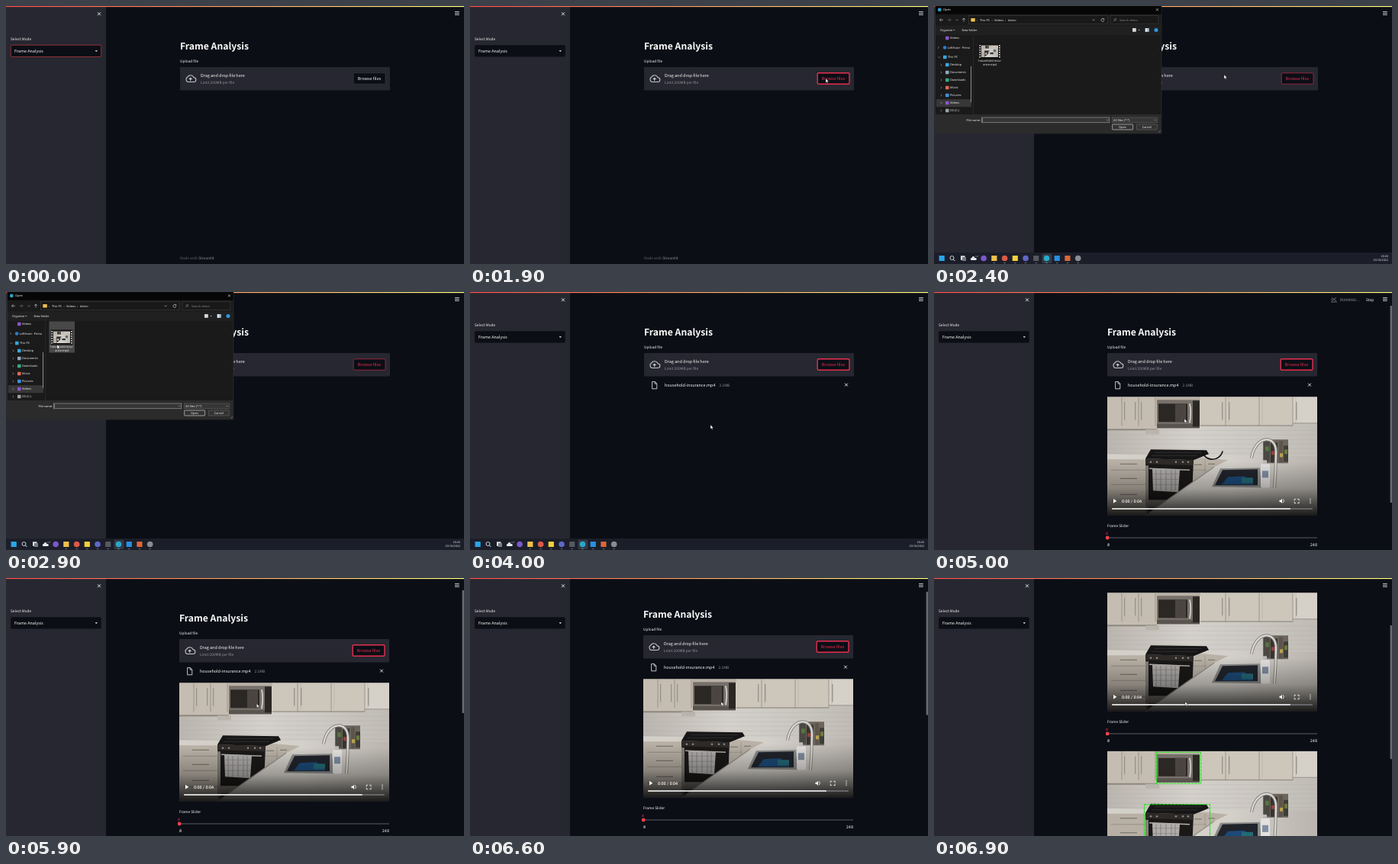
Animation, 600 px wide and 338 px high, one loop 7000 ms. Source, as an HTML page:

```html
<!DOCTYPE html>
<html lang="en">
<head>
<meta charset="utf-8">
<title>Frame Analysis</title>
<style>
html, body { margin: 0; width: 100%; height: 100%; overflow: hidden; background: #0b0e15; }
svg { display: block; width: 600px; height: 338px; }
text { fill: #fafafa; font-family: "Noto Sans CJK JP", "Noto Sans CJK SC", "Noto Sans CJK", sans-serif; font-weight: 500; white-space: pre; text-rendering: geometricPrecision; }
.ui text { font-family: "Open Sans", sans-serif; }
.mono { font-family: "Noto Sans Mono", monospace; }
.time { font-family: Roboto, sans-serif; }
</style>
</head>
<body>
<svg id="stage" viewBox="0 0 600 338"></svg>
<script>
const LOOP = 7000, STEP = 100;
const BG = '#0b0e15', PANEL = '#262730', RED = '#e62f50', GREY = '#94969d';
const BODY = 5.45, SMALL = 4.8;
const $ = id => document.getElementById(id);

const text = (x, y, size, str, more = '') => `<text x="${x}" y="${y}" font-size="${size}" ${more}>${str}</text>`;
const rect = (x, y, w, h, fill, more = '') => `<rect x="${x}" y="${y}" width="${w}" height="${h}" fill="${fill}" ${more}/>`;
const dot = (x, y, r, fill, more = '') => `<circle cx="${x}" cy="${y}" r="${r}" fill="${fill}" ${more}/>`;
const poly = (points, fill) => `<polygon points="${points}" fill="${fill}"/>`;
const line = (d, stroke, w = 0.6, more = '') => `<path d="${d}" fill="none" stroke="${stroke}" stroke-width="${w}" ${more}/>`;
const group = (id, body, more = '') => `<g id="${id}" ${more}>${body}</g>`;
const cross = (x, y, r, w) => line(`M${x - r},${y - r}l${2 * r},${2 * r}m0,${-2 * r}l${-2 * r},${2 * r}`, '#f4f4f5', w);
const border = (color, w = 0.5) => `stroke="${color}" stroke-width="${w}"`;
const fade = (id, stops, more = '') => `<linearGradient id="${id}" ${more}>` +
  stops.map(([offset, color, alpha = 1]) => `<stop offset="${offset}" stop-color="${color}" stop-opacity="${alpha}"/>`).join('') + '</linearGradient>';

// Kitchen scene, 275 x 155
function kitchen() {
  let s = rect(0, 0, 275, 155, 'url(#wall)');
  for (let y = 44; y < 76; y += 6) s += line(`M0,${y}H275`, '#aaa59f', 0.25);
  // upper cabinets
  s += rect(0, 0, 65, 42, '#c5bdb1') + rect(64, 0, 60, 4, '#b9b1a6') + rect(122, 0, 121, 37, '#cdc6bb') + rect(243, 0, 32, 34, '#d5d0c8');
  s += rect(0, 42, 65, 2, '#8e8880') + rect(122, 37, 121, 1.5, '#9c968d') + rect(243, 34, 32, 1.2, '#a39e96');
  for (const x of [19, 41, 63, 155, 199, 243]) s += line(`M${x},0V38`, '#918a82', 0.8) + line(`M${x + 4},0V35`, '#b3aca1', 0.5);
  for (const x of [23, 37, 45, 151, 160, 248]) s += line(`M${x},7V30`, '#7f7971', 1.6) + line(`M${x + .3},7V30`, '#e6e1d9', 0.6);
  s += rect(50, 43, 18, 6, '#b9b4ac', 'rx="1"');
  // microwave
  s += rect(65, 4, 56, 37, '#77706a', 'rx="1"') + rect(65, 35.5, 56, 5.5, '#5a544f') + rect(67, 9, 38, 24, '#2b2724');
  s += rect(89, 9, 14, 24, '#4b4541') + rect(112, 5, 9, 34, '#2a2725') + line('M108,9Q110.5,20 108,34', '#d6d2cc', 1.7);
  // left drawers
  s += rect(0, 76, 53, 79, '#b8b0a5') + poly('0,75 54,76 51,82 0,82', '#d3cfc9');
  for (const y of [96, 115, 136]) s += line(`M5,${y}H50`, '#877f76', 0.7) + line(`M17,${y - 8}H39`, '#6e6861', 1);
  // cabinet front beside the stove
  s += poly('109,80 160,80 160,100 85,155 108,150', '#b9b1a6') + line('M110,96H130M128,83V100', '#8f887f', 0.6) + line('M114,89H124M132,88H141', '#6e6861', 0.9);
  // stove
  s += poly('57,69 130,70 133,75 113,83 50,81', '#171616') + line('M62,73H124M58,77H118', '#403c3b', 0.6);
  s += poly('50,81 113,83 110,155 52,152', '#1a1918') + poly('50,81 113,83 112,90 51,88', '#2e2a28') + rect(50, 90, 4, 61, '#85807a') + rect(54, 135, 55, 10, '#7d7872');
  for (const x of [57, 65, 90, 99, 106]) s += dot(x, 85.5, 1.3, '#8d8883');
  s += line('M55,94L108,96', '#b5b1ab', 1.6) + poly('59,94 95,95 93,125 60,123', '#b0adab');
  for (const x of [64, 70, 77, 84, 89]) s += line(`M${x},96V123`, '#8a8887', 1.2);
  for (const y of [101, 108, 115]) s += line(`M60,${y}H93`, '#8a8887', 0.8);
  // counter and sink
  s += poly('130,76 275,78 275,155 50,155 140,92 158,83 128,80', 'url(#counter)') + line('M140,92L50,155', '#938e87', 1.2);
  s += poly('148,94 200,93 202,119 137,118', '#8a8a89') + poly('151,96 197,95 197,116 141,116', '#20242b') + poly('158,105 180,104 192,115 150,115', '#1c4a78') + rect(176, 106, 15, 7, '#236a77');
  // jars, faucet, bottle
  s += rect(204, 56, 33, 31, '#6b655d') + rect(205, 57, 8, 28, '#4b4843') + rect(214, 60, 9, 26, '#35322f') + rect(225, 58, 5, 28, '#5d554b') + rect(231, 64, 6, 21, '#3d3c39');
  s += rect(207, 65, 5, 6, '#58733f') + rect(215, 71, 6, 5, '#9a403a') + rect(232, 69, 4, 6, '#6e7a3a') + rect(226, 74, 4, 5, '#b6a14e');
  const tap = 'M219,119Q221,95 221,72C221,49 194,50 189,80';
  s += line(tap, '#85827e', 4) + line(tap, '#dedcd8', 2) + rect(201, 88, 12, 31, '#e2e1df', 'rx="2"') + rect(203, 97, 8, 9, '#7f8ea1') + rect(204, 83, 5, 5, '#bdbbb8');
  return s;
}

function controls() {
  return rect(0, 85, 275, 70, 'url(#shade)') + poly('8,133.8 8,139.2 12.4,136.5', '#fff') +
    text(19, 138.5, 5.4, '0:00 / 0:04', 'class="time"') +
    poly('225.5,135.4 227,135.4 229,133.6 229,139.4 227,137.6 225.5,137.6', '#fff') + line('M230.2,134q2.6,2.5 0,5', '#fff', 0.8) +
    line('M245.2,136v-2h2m2,0h2v2m0,1.4v2h-2m-2,0h-2v-2', '#fff', 0.8) +
    [134, 136.5, 139].map(y => dot(266, y, 0.7, '#fff')).join('') +
    rect(6, 146, 263, 1.5, '#77777a', 'rx=".7"') + rect(6, 146, 234, 1.5, '#f5f5f5', 'rx=".7"');
}

function page() {
  const upload = rect(228, 80, 275, 30.5, PANEL, 'rx="1"') +
    line('M238.3,99.5a3.6,3.6 0 0 1 -.4,-6.6a4.6,4.6 0 0 1 8.2,.8a2.9,2.9 0 0 1 -.3,5.8zM241.7,98v-3.6m-1.7,1.6l1.7,-1.8l1.7,1.8', '#c6c7cb', 1.1) +
    text(255, 93, BODY, 'Drag and drop file here') + text(255, 102, SMALL, 'Limit 200MB per file', `style="fill:${GREY}"`) +
    rect(455.2, 87.8, 41.8, 14.4, BG, 'id="btn" rx="1.5"') + text(476, 97, BODY, 'Browse files', 'id="btnText" text-anchor="middle"');
  const file = line('M238.6,117.5h3.8l2.4,2.5v6.8h-6.2zM242.2,117.5v2.7h2.6', '#d5d6da', 0.9) +
    text(255, 124, BODY, 'household-insurance.mp4') + text(326.5, 124, SMALL, '2.1MB', `style="fill:${GREY}"`) + cross(493, 121.6, 1.9, 0.9);
  const result = '<use href="#kitchen"/>' + line('M64.5,1.5H122.5V42.5H64.5zM48.5,70H134.5V152H48.5z', '#22e31c', 1.1, 'stroke-dasharray="4 .7"');
  const player = group('', '<use href="#kitchen"/>' + line('M-13.8,-3A14,14 0 0 0 13.7,-2', '#121212', 1.5, 'id="spin"') + controls(), 'transform="translate(228 137.3)"') +
    text(228, 308, SMALL, 'Frame Slider') + text(227.5, 317.6, 4.6, '0', `class="mono" text-anchor="middle" style="fill:${RED}"`) +
    rect(228, 321.4, 275, 1.2, '#4d4f58') + dot(228.2, 322, 2.4, '#f5404c') +
    text(228, 333, 5.2, '0', 'class="mono"') + text(503, 333, 5.2, '248', 'class="mono" text-anchor="end"') +
    group('result', result, 'transform="translate(228 344.8)" clip-path="url(#frame)"');
  return text(228, 57, 12.2, 'Frame Analysis', 'style="font-weight:600"') + text(228, 73.6, SMALL, 'Upload file') + upload +
    group('file', file) + group('player', player) +
    group('footer', text(228, 332, SMALL, 'Made with <tspan style="fill:#8e9096">Streamlit</tspan>', 'style="fill:#60626a"'));
}

function sidebar() {
  return rect(0, 0, 131, 338, PANEL) + cross(122, 10.3, 2, 0.9) + text(6, 45, SMALL, 'Select Mode') +
    rect(6.3, 51.2, 118.4, 15.4, BG, 'id="select" rx="1.5"') + text(11, 61, BODY, 'Frame Analysis') + poly('116.6,58.2 120,58.2 118.3,60.1', '#f4f4f5');
}

function taskbar() {
  const apps = [['#2aa5e8', 0], ['', 0], ['', 0], ['', 0], ['#7a58c8', 1], ['#efc14b', 0], ['#dd5a48', 1], ['#f4cf3c', 0], ['#6067c4', 1], ['#555a62', 0], ['#2aa7c9', 1], ['#2a8fe0', 0], ['#d9683a', 0], ['#8b8d92', 1]];
  let s = rect(0, 323, 600, 15, '#1b1e29') + rect(141.5, 324.5, 13, 12.5, '#343844', 'rx="1.5"');
  apps.forEach(([color, round], i) => {
    const x = 10.2 + i * 13.73;
    if (color) s += round ? dot(x, 330.5, 3.8, color) : rect(x - 3.6, 327, 7.2, 7, color, 'rx=".6"');
    if (i > 4) s += rect(x - 1.2, 336, 2.4, 0.7, i === 10 ? '#55b8ee' : '#8a8d96');
  });
  s += dot(23.5, 330, 2.5, 'none', border('#e5e6ea', 0.9)) + line('M25.4,332l2,2', '#e5e6ea', 1);
  s += rect(35, 327.3, 5.5, 5.5, '#e1e2e6') + rect(37, 329, 5, 5, '#777b84');
  s += line('M49.3,331.6h5', '#e8eaee', 3, 'stroke-linecap="round"') + dot(51.5, 330, 1.9, '#e8eaee') + text(54, 329, 3, '12°');
  return s + text(595, 329.4, 3.7, '20:26', 'text-anchor="end"') + text(595, 334.4, 3.7, '23/10/2022', 'text-anchor="end"');
}

function dialog() {
  const label = (x, y, str, more) => text(x, y, 3.9, str, more);
  let s = rect(1.5, 0, 296.5, 167, '#1a1a1a', border('#3a3a3a')) + rect(2, 0.2, 295.6, 10.5, '#060606');
  s += dot(7.3, 4.9, 2.4, '#2aa0c4') + label(12, 6.4, 'Open') + cross(292.5, 4.8, 1.5, 0.6);
  // address row
  s += line('M12,18.2H7.5m2,-2l-2,2l2,2', '#d8d8d8') + line('M17.5,18.2H22m-2,-2l2,2l-2,2', '#777') + line('M28.5,17.6l1.6,1.6l1.6,-1.6', '#aaa') + line('M39,20.6V16m-2,2l2,-2l2,2', '#d8d8d8');
  s += rect(45.5, 12.6, 182, 11.2, '#191919', border('#484848')) + rect(48.3, 16, 5.5, 4.4, '#eec04a', 'rx=".5"');
  s += label(56, 19.6, '›') + label(60, 19.6, 'This PC') + label(75.5, 19.6, '›') + label(79, 19.6, 'Videos') + label(93, 19.6, '›') + label(97, 19.6, 'demo');
  s += line('M207.5,17.5l1.6,1.6l1.6,-1.6', '#ccc') + line('M222.6,17.2a2,2 0 1 0 .3,1.6m-.1,-2.6v1.4h-1.4', '#ddd');
  s += rect(231, 12.6, 63, 11.2, '#191919', border('#484848')) + dot(237.5, 17.7, 1.3, 'none', border('#aaa')) + line('M236.6,18.8l-1.3,1.3', '#aaa') + label(243, 19.6, 'Search demo', 'style="fill:#8a8a8a"');
  // toolbar
  s += rect(2, 25.5, 295.6, 12.5, '#202020') + label(8, 33, 'Organise') + poly('25,30.9 27.4,30.9 26.2,32.2', '#ccc') + label(36.5, 33, 'New folder');
  s += rect(260, 29, 4.8, 4.8, '#d6d6d6') + poly('267.4,30.9 269.8,30.9 268.6,32.2', '#ccc') + rect(276.8, 29, 5, 4.8, '#9fc3de') + rect(276.8, 29, 2, 4.8, '#eee') + dot(291, 31.4, 2.5, '#2a9be0');
  // folder tree
  const tree = [[42, 21, '#8a56c8', 'Videos', ''], [54.5, 17.5, '#2b7fd6', 'LoftHaze - Perso', '›'], [67, 18, '#3aa6dc', 'This PC', '⌄'], [77, 21, '#3ba7dd', 'Desktop', '›'], [87, 21, '#8fa9bd', 'Documents', '›'],
    [97, 21, '#39a889', 'Downloads', '›'], [107, 21, '#df6a55', 'Music', '›'], [117, 21, '#3b91dd', 'Pictures', '›'], [127, 21, '#8a56c8', 'Videos', '›'], [137, 21, '#9b9fa4', 'OS (C:)', '›']];
  s += rect(3, 122.2, 46, 10, '#373737');
  for (const [y, x, color, name, mark] of tree) {
    const round = name.startsWith('Loft');
    s += (round ? dot(x - 3.4, y, 2.2, color) : rect(x - 6, y - 2.2, 4.6, 4.4, color, 'rx=".6"')) + label(x, y + 1.4, name);
    if (mark === '›') s += line(`M${x - 12.3},${y - 1.3}l1.4,1.3l-1.4,1.3`, '#bbb', 0.5);
    if (mark === '⌄') s += line('M5.5,66.4l1.4,1.4l1.4,-1.4', '#bbb', 0.5);
  }
  s += rect(48, 79, 1, 47, '#8f8f8f') + rect(51.5, 38, 0.5, 104, '#353535');
  // file tile
  s += rect(56.5, 38.5, 33.5, 41, '#484848', 'id="tile"') + rect(58.8, 49.5, 28.5, 19.5, '#111');
  for (let y = 51; y < 68; y += 3) s += rect(59.4, y, 1.8, 1.6, '#ddd') + rect(85, y, 1.8, 1.6, '#ddd');
  s += '<g transform="translate(62 51.5) scale(.08 .1)"><use href="#kitchen"/></g>';
  s += label(73.2, 73, 'household-insur', 'text-anchor="middle"') + label(73.2, 78, 'ance.mp4', 'text-anchor="middle"');
  // bottom bar
  s += rect(2, 142, 295.6, 24.8, '#2b2b2b') + label(61, 150.8, 'File name:', 'text-anchor="end"');
  s += rect(62.3, 146, 167.5, 6.8, '#363636', border('#b8b8b8')) + rect(63.5, 147.2, 0.4, 4.4, '#eee', 'id="caret"') + label(64, 150.8, 'household-insurance.mp4', 'id="picked"') + line('M226,148.8l1.2,1.2l1.2,-1.2', '#ccc', 0.5);
  s += rect(233.3, 146, 59, 6.8, '#363636', border('#666')) + label(235, 150.8, 'All files (*.*)') + line('M288.5,148.8l1.2,1.2l1.2,-1.2', '#ccc', 0.5);
  s += rect(233.6, 155, 27, 7, '#333', border('#e5e5e5', 0.6) + ' rx=".8"') + label(247, 160, 'Open', 'text-anchor="middle"');
  s += rect(265.3, 155, 27, 7, '#333', border('#777') + ' rx=".8"') + label(278.7, 160, 'Cancel', 'text-anchor="middle"');
  return s + line('M296.8,163l-2.4,2.4m2.4,-.8l-.8,.8', '#aaa', 0.5);
}

const running = line('M520,13h8M521,7.5l3,2l3,-2.2M524,9.5l-2.6,3M524,9.5l3,2.4M520,10h2', GREY, 0.7) +
  text(532, 12, 4.7, 'RUNNING...', `style="fill:${GREY}"`) + text(566, 12, SMALL, 'Stop');

$('stage').innerHTML = '<defs>' + fade('bar', [[0, '#ff4b4b'], [1, '#fffd80']]) +
  fade('shade', [[0, '#000', 0], [0.5, '#000', 0.26], [1, '#000', 0.85]], 'x2="0" y2="1"') +
  fade('wall', [[0, '#bab5ae'], [0.4, '#d4d0cb'], [0.7, '#cbc7c1'], [1, '#bfbbb5']]) +
  fade('counter', [[0, '#d9d6d0'], [0.5, '#d3cfc9'], [1, '#b9b5ae']]) +
  `<clipPath id="frame"><rect width="275" height="155"/></clipPath><g id="kitchen" clip-path="url(#frame)">${kitchen()}</g></defs>` +
  rect(0, 0, 600, 338, BG) + group('page', page()) + rect(131, 0, 469, 17.5, BG) + sidebar() +
  line('M588,8.5h5.8m-5.8,2h5.8m-5.8,-4h5.8', '#e8e8ea', 0.8, 'transform="translate(0 1)"') + group('running', running) +
  rect(597.6, 18, 2.4, 258, '#686a70', 'id="thumb" rx=".6"') + rect(0, 0, 600, 1.2, 'url(#bar)') +
  group('taskbar', taskbar(), 'class="ui"') + group('dialog', dialog(), 'class="ui"') +
  group('cursor', '<path d="M0,0V5.4L1.3,4.2L2.2,6.2L3.1,5.8L2.2,3.9H3.9Z" fill="#fff" stroke="#111" stroke-width=".35"/>');

// Tables of [time, ...values], linear in between
const pointer = [[900, 216, 104], [1100, 340, 50], [1200, 551, 21], [1400, 500, 80], [1600, 466, 95], [2200, 466, 95], [2400, 380, 90], [2500, 311, 85], [2800, 67, 69], [3100, 67, 69], [3500, 247, 156], [3700, 247, 156], [4000, 315, 174], [4500, 315, 174], [4800, 328, 166], [5700, 328, 166], [6300, 329, 162]];
const scrolling = [[6500, 0], [6600, 5], [6700, 34], [6800, 78], [6900, 118]];
const runFade = [[4300, 0], [4500, 0.1], [4600, 0.4], [4700, 1], [5400, 1], [5500, 0]];

function at(table, t) {
  const i = table.findIndex(row => row[0] > t);
  if (i < 0) return table[table.length - 1].slice(1);
  if (i === 0) return table[0].slice(1);
  const a = table[i - 1], b = table[i], k = (t - a[0]) / (b[0] - a[0]);
  return a.slice(1).map((v, j) => v + (b[j + 1] - v) * k);
}

const set = (id, attrs) => { for (const key in attrs) $(id).setAttribute(key, attrs[key]); };
const show = (id, on) => { $(id).style.display = on ? '' : 'none'; };
const within = (t, from, to) => t >= from && t < to;

function draw(t) {
  const [x, y] = at(pointer, t), [scroll] = at(scrolling, t);
  const loaded = t >= 5000, hover = t >= 1500;
  set('cursor', { transform: `translate(${x} ${y})` });
  show('cursor', t >= 900);
  set('page', { transform: `translate(${loaded ? -1 : 0} ${-scroll})` });
  set('select', { stroke: t < 1800 ? '#c43a45' : 'none', 'stroke-width': 0.7 });
  const ring = t >= 1800 && !within(t, 2000, 3600);
  set('btn', { stroke: hover ? RED : '#3c3e46', 'stroke-width': ring ? 1.4 : 0.6 });
  $('btnText').style.fill = hover ? RED : '';
  show('file', t >= 3900);
  show('player', loaded);
  show('footer', !loaded);
  show('result', t >= 5500);
  show('spin', within(t, 5000, 5300));
  set('spin', { transform: `translate(137.5 73) rotate(${(t - 5000) * 0.36})` });
  set('running', { opacity: at(runFade, t)[0] });
  show('thumb', loaded);
  set('thumb', t < 5500 ? { y: 18, height: 258 } : { y: 16 + scroll * 0.39, height: 161 + scroll * 0.12 });
  show('taskbar', within(t, 2000, 4100));
  show('dialog', within(t, 2100, 3600));
  set('tile', { fill: t >= 3000 ? '#666' : within(t, 2800, 3000) ? '#484848' : '#1a1a1a' });
  show('picked', t >= 3000);
  show('caret', t < 3000);
}

const start = performance.now();
function tick() {
  const t = (performance.now() - start) % LOOP;
  draw(Math.floor(t / STEP) * STEP);
  requestAnimationFrame(tick);
}
tick();
</script>
</body>
</html>
```
